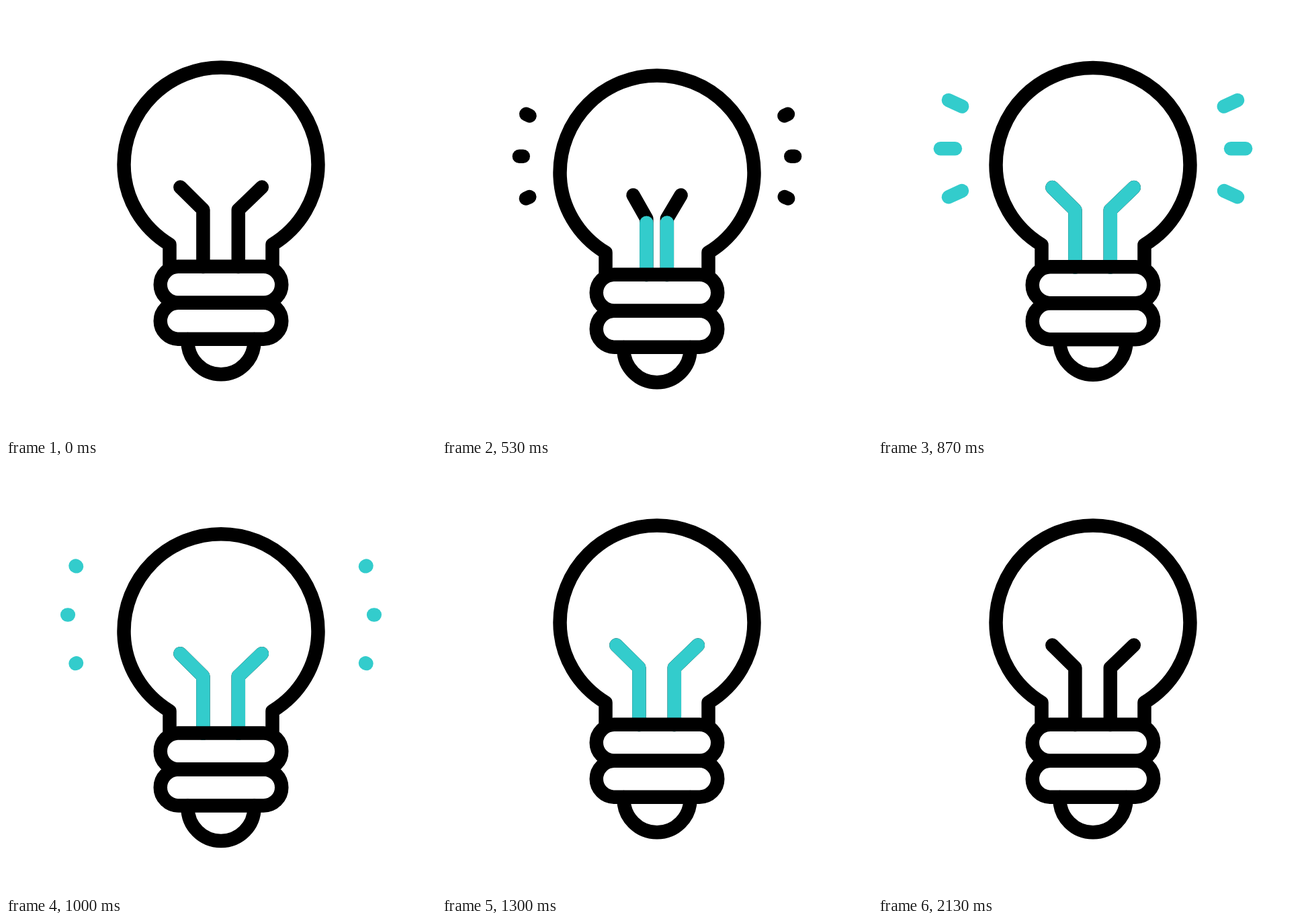
Write an HTML page that moves like this. It is 640x640 px and loops after 2.5 s.

```html
<!DOCTYPE html>
<html lang="en">
<head>
<meta charset="utf-8">
<title>Light bulb</title>
<style>
  html, body { margin: 0; width: 100%; height: 100%; overflow: hidden; background: #fff; }
  svg { display: block; width: 100%; height: 100%; }
  path, rect { fill: none; stroke: #000; stroke-width: 20.5; stroke-linecap: round; stroke-linejoin: round; }
  .lit { stroke: #33cccc; }
</style>
</head>
<body>
<svg viewBox="0 0 640 640">
  <g id="lamp">
    <g id="rays"></g>
    <g id="filaments"></g>
    <path d="M243.5 388V355C203 330.5 175.5 286.5 175.5 236A144.5 144.5 0 0 1 464.5 236C464.5 286.5 437 330.5 396.5 355V388"/>
    <rect x="229.75" y="387.75" width="180.5" height="54" rx="27"/>
    <rect x="229.75" y="441.75" width="180.5" height="54" rx="27"/>
    <path d="M270.5 496V498.75A49.5 49.5 0 0 0 369.5 498.75V496"/>
  </g>
</svg>
<script>
const LOOP = 2500, FPS = 30;
const lamp = document.getElementById('lamp');

function addPath(parentId, lit, d = '') {
  const path = document.createElementNS('http://www.w3.org/2000/svg', 'path');
  path.setAttribute('d', d);
  path.setAttribute('pathLength', 1);
  if (lit) path.setAttribute('class', 'lit');
  document.getElementById(parentId).append(path);
  return path;
}

// Each ray runs from its inner end to its outer end
const rayShapes = [[130.5, 151.5, 103.5, 139], [120.75, 211.8, 91.25, 211.8], [130.2, 272.2, 103.5, 284.4]]
  .flatMap(([x1, y1, x2, y2]) => [`M${x1} ${y1}L${x2} ${y2}`, `M${640 - x1} ${y1}L${640 - x2} ${y2}`]);
const [darkRays, litRays] = [false, true].map(lit => rayShapes.map(d => addPath('rays', lit, d)));
const [darkWires, litWires] = [false, true].map(lit => [-1, 1].map(() => addPath('filaments', lit)));

// Show only the part of a path between two fractions of its length
function trim(path, start, end) {
  path.style.display = end > start ? '' : 'none';
  path.style.strokeDasharray = `${end - start} 2`;
  path.style.strokeDashoffset = -start;
}

function draw(frame) {
  const ease = (from, to) => {
    const u = Math.min(1, Math.max(0, (frame - from) / (to - from)));
    return u * u * (3 - 2 * u);
  };
  const dip = start => ease(start, start + 9) - ease(start + 9, start + 13.7);
  lamp.setAttribute('transform', `translate(0 ${23 * (dip(11.4) + dip(25.2))})`);

  const pinch = ease(9, 20) - ease(20.7, 25.4);
  const glow = ease(9, 21) - ease(52, 64);
  [-1, 1].forEach((side, i) => {
    const tip = 320.1 + side * (60.75 - 36 * pinch);
    const stem = 319.6 + side * (26.2 - 15.65 * pinch);
    const d = `M${stem} 388V${303.3 + 1.8 * pinch}L${tip} 269.6`;
    darkWires[i].setAttribute('d', d);
    litWires[i].setAttribute('d', d);
    trim(litWires[i], 0, glow);
  });

  const sweep = (rays, start) =>
    rays.forEach(ray => trim(ray, ease(start + 4, start + 11), ease(start, start + 7)));
  sweep(darkRays, 14);
  sweep(litRays, 20);
}

function tick() {
  const time = performance.now() % LOOP;
  draw(Math.floor(time * FPS / 1000 + 0.15));
  requestAnimationFrame(tick);
}
tick();
</script>
</body>
</html>
```
